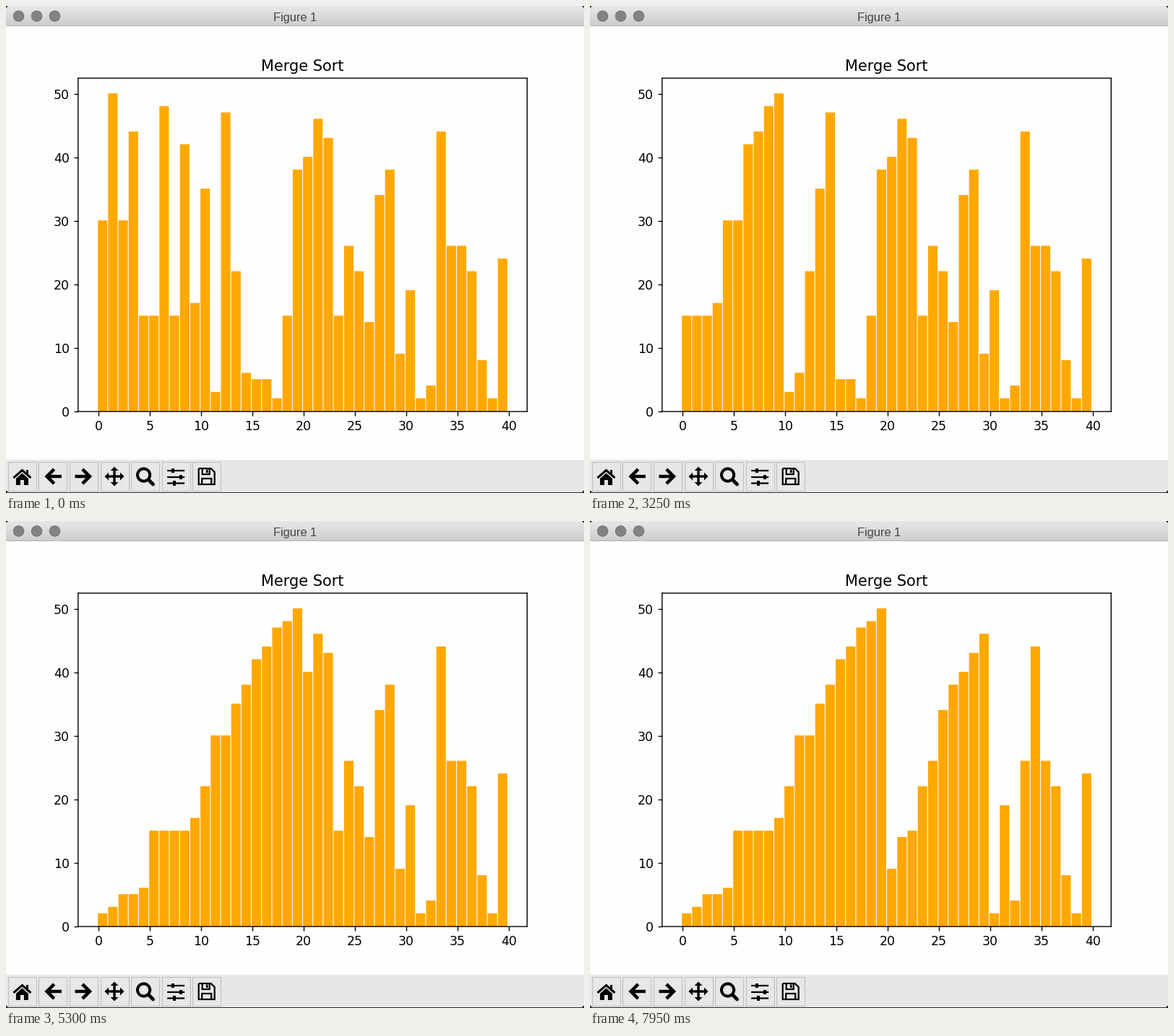
Animation, 800 px wide and 675 px high, one loop 8000 ms. Source, as a matplotlib script:

```python
import matplotlib.pyplot as plt
import numpy as np
from matplotlib.animation import FuncAnimation
from matplotlib.patches import Circle, Polygon, Rectangle

W, H, DPI = 800, 675, 125
FRAMES, INTERVAL = 160, 50
PT = 72 / DPI  # points per pixel
INK, PANEL, PAPER, ORANGE = "#000000", "#e8e6e8", "#fffeff", "#ffa800"
EDGE = "#2a282a"

VALUES = [30, 50, 30, 44, 15, 15, 48, 15, 42, 17,
          35, 3, 47, 22, 6, 5, 5, 2, 15, 38,
          40, 46, 43, 15, 26, 22, 14, 34, 38, 9,
          19, 2, 4, 44, 26, 26, 22, 8, 2, 24]


def merge_sort(a, start, end):
    """Sort a[start:end] in place, yielding after every write and merge."""
    if end - start < 2:
        return
    mid = (start + end) // 2
    yield from merge_sort(a, start, mid)
    yield from merge_sort(a, mid, end)
    for i, v in enumerate(sorted(a[start:end]), start):
        a[i] = v
        yield list(a)
    yield list(a)


states = [VALUES, *merge_sort(list(VALUES), 0, len(VALUES))]


def step_at(frame):
    # the sort runs a touch slower than the clock, so two steps are held
    return frame + 1 - (frame >= 75) - (frame >= 151)


plt.rcParams["toolbar"] = "None"
plt.rcParams["font.family"] = "DejaVu Sans"
fig = plt.figure(figsize=(W / DPI, H / DPI), dpi=DPI, facecolor=PAPER)

# ---- window frame, in pixel coordinates from the top left
ui = fig.add_axes([0, 0, 1, 1])
ui.axis("off")


def rect(x0, y0, x1, y1, color, edge="none", lw=0):
    ui.add_patch(Rectangle((x0, y0), x1 - x0, y1 - y0, fc=color, ec=edge,
                           lw=lw * PT))


def poly(points, color=INK):
    ui.add_patch(Polygon(points, fc=color, ec="none"))


def line(points, lw, closed=False, cap="butt"):
    pts = list(points) + (list(points[:1]) if closed else [])
    ui.plot(*zip(*pts), color=INK, lw=lw * PT, solid_capstyle=cap,
            solid_joinstyle="miter", snap=False)


def home(x, y):
    line([(x - 12, y + 2), (x, y - 8.5), (x + 12, y + 2)], 3)
    poly([(x - 8.5, y + 3), (x, y - 4.5), (x + 8.5, y + 3), (x + 8.5, y + 12),
          (x + 2.5, y + 12), (x + 2.5, y + 5), (x - 2.5, y + 5),
          (x - 2.5, y + 12), (x - 8.5, y + 12)])
    rect(x + 6, y - 9, x + 9, y - 2, INK)


def arrow(x, y, d):
    line([(x - d * 12, y), (x + d * 9, y)], 4.4)
    line([(x - d * 1.7, y - 10), (x + d * 8.3, y), (x - d * 1.7, y + 10)], 4.6)


def move(x, y):
    line([(x - 11, y), (x + 11, y)], 3.4)
    line([(x, y - 11), (x, y + 11)], 3.4)
    for dx, dy in ((1, 0), (-1, 0), (0, 1), (0, -1)):
        poly([(x + 13.5 * dx, y + 13.5 * dy),
              (x + 8 * dx + 5.5 * dy, y + 8 * dy + 5.5 * dx),
              (x + 8 * dx - 5.5 * dy, y + 8 * dy - 5.5 * dx)])


def zoom(x, y):
    ui.add_patch(Circle((x - 2, y - 2), 8.6, fc="none", ec=INK, lw=4 * PT))
    line([(x + 4.5, y + 4.5), (x + 11, y + 11)], 4.8, cap="round")


def sliders(x, y):
    for dy, knob in ((-8, -4), (1, 7), (9.5, -2)):
        line([(x - 12, y + dy), (x + 12, y + dy)], 2.2)
        rect(x + knob - 3.5, y + dy - 3, x + knob + 3.5, y + dy + 3, PANEL)
        rect(x + knob - 2, y + dy - 3.2, x + knob + 2, y + dy + 3.2, INK)


def save(x, y):
    line([(x - 11, y - 11), (x + 6, y - 11), (x + 11, y - 6),
          (x + 11, y + 11), (x - 11, y + 11)], 2.2, closed=True)
    line([(x - 6, y - 11), (x - 6, y - 3), (x + 4, y - 3), (x + 4, y - 11)], 2.2)
    line([(x + 0.5, y - 9.5), (x + 0.5, y - 5)], 2.6)
    line([(x - 6.5, y + 11), (x - 6.5, y + 3), (x + 6.5, y + 3),
          (x + 6.5, y + 11)], 2.2)


# title bar
shade = np.linspace([232, 230, 232], [207, 205, 207], 27) / 255
ui.imshow(shade[:, None, :], extent=(0, W, 27, 0), aspect="auto",
          interpolation="nearest")
rect(0, 27, W, 28, "#b4b2b4")
for cx in (17.5, 42.5, 67.5):
    ui.add_patch(Circle((cx, 14), 7.2, fc="#848284", ec="#706e70", lw=PT))
ui.text(400, 20.8, "Figure 1", family="Liberation Sans", size=16.4 * PT,
        color="#454345", ha="center", va="baseline")

# toolbar
rect(0, 629, W, 674, PANEL)
tools = (home, lambda x, y: arrow(x, y, -1), lambda x, y: arrow(x, y, 1),
         move, zoom, sliders, save)
for i, draw in enumerate(tools):
    cx = 22.4 + 42.55 * i
    rect(cx - 19.5, 631.5, cx + 19.5, 671.5, PANEL, "#bebcbe", 1)
    draw(cx, 652)

# window edge and corners
rect(0, 674, W, H, EDGE)
for x, dx in ((0, 1), (W, -1)):
    for y, dy in ((0, 3), (H, -4)):
        poly([(x, y), (x + abs(dy) * dx, y), (x, y + dy)], EDGE)
ui.set(xlim=(0, W), ylim=(H, 0))

# ---- bar chart
left, right, top, bottom = 99.8, 721.3, 100, 562.1
ax = fig.add_axes([left / W, 1 - bottom / H, (right - left) / W,
                   (bottom - top) / H], facecolor="none")
bars = ax.bar(range(len(VALUES)), VALUES, width=0.8, align="edge",
              color=ORANGE, edgecolor=ORANGE, lw=1, snap=False)
ax.set(xlim=(-1.99, 41.79), ylim=(0, 52.5), title="Merge Sort",
       xticks=range(0, 41, 5), yticks=range(0, 51, 10))
for spine in ax.spines.values():
    spine.set_snap(False)


def update(frame):
    for bar, v in zip(bars, states[step_at(frame)]):
        bar.set_height(v)
    return bars.patches


anim = FuncAnimation(fig, update, frames=FRAMES, interval=INTERVAL,
                     repeat=True, repeat_delay=0)
plt.show()
```
